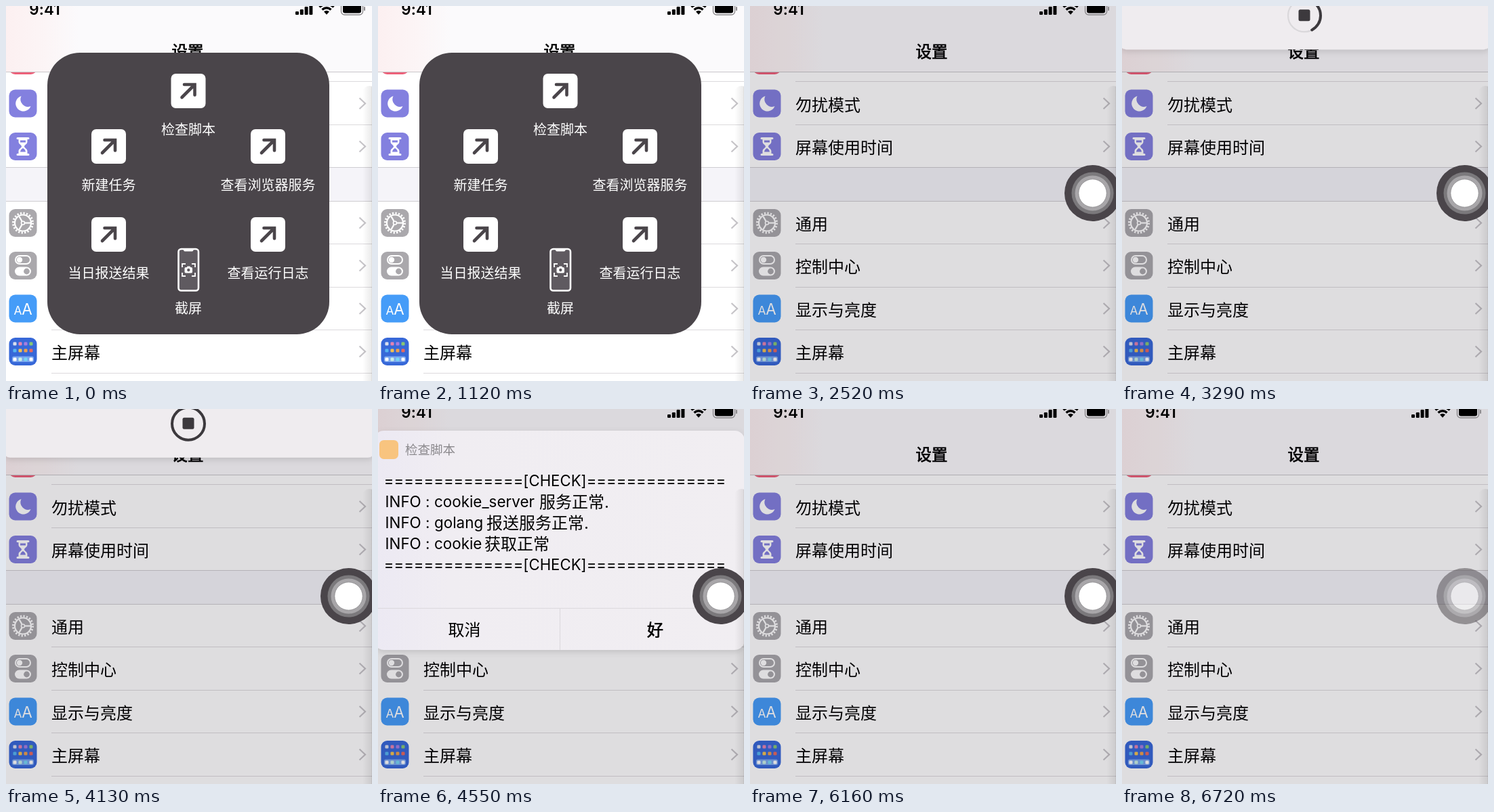
An HTML page for the animation above (6.79 s loop, 540 px wide and 554 px high).

```html
<!DOCTYPE html>
<html lang="zh-CN">
<head>
<meta charset="utf-8">
<style>
html, body { margin: 0; width: 100%; height: 100%; overflow: hidden; background: #fff; }
svg { display: block; width: 540px; height: 554px; }
text { font-family: Inter, "Noto Sans CJK SC", "Noto Sans CJK", sans-serif; white-space: pre; font-feature-settings: "calt" 0; }
</style>
</head>
<body>
<svg id="stage" viewBox="0 0 540 554"></svg>
<script>
const LOOP = 6790, STEP = 70;
const stage = document.getElementById('stage');

// y is the visual middle of the line
const text = (s, x, y, size, o = '') =>
  `<text x="${x}" y="${y + size * .375}" font-size="${size}" ${o}>${s}</text>`;
const rect = (x, y, w, h, r, fill, o = '') =>
  `<rect x="${x}" y="${y}" width="${w}" height="${h}" rx="${r}" fill="${fill}" ${o}/>`;
const circle = (x, y, r, fill, o = '') => `<circle cx="${x}" cy="${y}" r="${r}" fill="${fill}" ${o}/>`;
const path = (d, stroke, w, o = '') => `<path d="${d}" fill="none" stroke="${stroke}" stroke-width="${w}" ${o}/>`;
const group = (id, s) => `<g id="${id}">${s}</g>`;
const at = (x, y, s) => `<g transform="translate(${x} ${y})">${s}</g>`;
const MID = 'text-anchor="middle"';
const SEMIBOLD = 'stroke="#000" stroke-width=".7"';
const DARK = '#4a454a';

// Row icons, drawn around their centre
const moon = '<path d="M-2.5-11A11.5 11.5 0 1 0 11.5 4A11 11 0 0 1-2.5-11Z" fill="#fff"/>';
const hourglass =
  path('M-8-12H8M-8 12H8', '#fff', 3, 'stroke-linecap="round"') +
  '<path d="M-6.5-11H6.5V-7C6.5-3 2-2.5 2 0S6.5 3 6.5 7V11H-6.5V7C-6.5 3-2 2.5-2 0S-6.5-3-6.5-7Z" fill="#fff"/>' +
  '<path d="M-4-9H4V-6H-4ZM-4 8Q-3.5 4 0 2.5Q3.5 4 4 8Z" fill="#8380df"/>';
const gear =
  circle(0, 0, 12, 'none', 'stroke="#fff" stroke-width="2.2"') +
  circle(0, 0, 14.5, 'none', `stroke="#fff" stroke-width="3" stroke-dasharray="${Math.PI * 29 / 40}"`) +
  circle(0, 0, 2.5, 'none', 'stroke="#fff" stroke-width="1.6"') +
  [0, 120, 240].map(a => path('M3 0H11', '#fff', 2.2, `transform="rotate(${a})"`)).join('');
const toggles =
  rect(-11, -14.5, 22, 12, 6, 'none', 'stroke="#fff" stroke-width="2"') + circle(-5, -8.5, 4.2, '#fff') +
  rect(-12, 2, 24, 13, 6.5, '#fff') + circle(5.5, 8.5, 4.4, '#aaa8ac');
const letters = text('A', -7.5, 2.5, 17.5, `${MID} fill="#fff"`) + text('A', 6, 1, 22.5, `${MID} fill="#fff"`);
const dotColors = ['#d9dfee', '#e583b0', '#a77ee0', '#88c774', '#56b5f0', '#f3c24f', '#eda04c', '#e8695f'];
let homeGrid = rect(-16, 7, 32, 8.5, 2.5, '#79a5ee');
for (let i = 0; i < 12; i++) {
  const row = i >> 2;
  homeGrid += rect(-14.5 + (i % 4) * 8, [-14, -4, 9][row], 5, 5, 1.3,
    row < 2 ? dotColors[i] : ['#fff', '#c9f0e4', '#76d5f3', '#fff'][i % 4]);
}

const rows = [
  [144, '#8380df', moon, '勿扰模式'], [207.5, '#8380df', hourglass, '屏幕使用时间'],
  [320.5, '#aaa8ac', gear, '通用'], [383.5, '#aaa8ac', toggles, '控制中心'],
  [447, '#459cf8', letters, '显示与亮度'], [510.5, '#3768d8', homeGrid, '主屏幕']
];

const settings =
  rect(0, 0, 540, 554, 0, '#fff') + rect(0, 238, 540, 51, 0, '#f5f4f9') +
  [111.5, 175.5, 351.5, 415.5, 478.5, 542.5].map(y => path(`M67 ${y}H540`, '#dcdadd', 1)).join('') +
  [238.5, 288.5].map(y => path(`M0 ${y}H540`, '#cfcdd1', 1)).join('') +
  rect(4.5, 60, 41, 41, 9, '#ec6079') +
  rows.map(([y, color, icon, label]) =>
    rect(4.5, y - 20.5, 41, 41, 9, color) + at(25, y, icon) +
    text(label, 67, y + 1.5, 24) +
    path(`M521.5 ${y - 8}L530 ${y}L521.5 ${y + 8}`, '#c6c4c8', 2.2)).join('') +
  rect(0, 0, 540, 97, 0, 'url(#nav)') + path('M0 97.5H540', '#c9c7ca', 1) +
  text('设置', 268, 67, 23.5, `${MID} ${SEMIBOLD}`);

const status =
  text('9:41', 57, 5, 22.5, `${MID} font-weight="600"`) +
  [5, 8, 12, 17].map((h, i) => rect(427 + i * 6.8, 13 - h, 5, h, 1.2, '#000')).join('') +
  path('M462.5 1.5Q473-7.5 483.5 1.5M466.5 5.5Q473 0 479.5 5.5', '#000', 3.4) +
  '<path d="M469 8.3Q473 5.3 477 8.3L473 12.8Z"/>' +
  rect(494.5, -5, 32, 18, 5, 'none', 'stroke="#8b898c" stroke-width="1.4"') +
  rect(497, -3, 27, 13.5, 3, '#000') + rect(528, 1, 2, 6, 1, '#8b898c');

const shortcuts = [
  [269, 125.5, '检查脚本'], [151.5, 207.5, '新建任务'], [386.5, 207.5, '查看浏览器服务'],
  [151.5, 337.5, '当日报送结果'], [386.5, 337.5, '查看运行日志']
];
const label = (s, x, y) => text(s, x, y, 20, `${MID} fill="#fff" font-weight="350"`);
const menuItems =
  shortcuts.map(([x, y, s]) =>
    rect(x - 25.5, y - 25.5, 51, 51, 7, '#fff') +
    at(x, y, path('M-9.5 9.5L9 -9M-6-9.5H9.5V6', DARK, 4.6, 'stroke-linecap="round"')) +
    label(s, x, y + 56.5)).join('') +
  rect(254.5, 359, 29.5, 61.5, 4, '#5f5a60', 'stroke="#fff" stroke-width="2.6"') +
  rect(262, 358, 14.5, 4.5, 2, '#fff') +
  path('M260 386V381H265M274 381H279V386M279 394V399H274M265 399H260V394', '#fff', 1.8) +
  rect(263.5, 386, 11.5, 8.5, 1.8, '#fff') + rect(267, 384.5, 5, 3, 1, '#fff') + circle(269.3, 390, 2.2, '#5f5a60') +
  label('截屏', 269, 446);

const knob =
  circle(505.5, 276.5, 31, '#7b797c') + circle(505.5, 276.5, 26, '#a8a6a9') +
  circle(505.5, 276.5, 20.7, '#fff', 'stroke="#8b898c" stroke-width=".8"');

const RING = 2 * Math.PI * 24;
const banner =
  rect(-4, 35, 548, 100, 10, '#efecef', 'filter="url(#shadow)"') +
  circle(269, 85, 24, 'none', 'stroke="#dad8db" stroke-width="2.2"') +
  circle(269, 85, 24, 'none', `id="arc" stroke="#3c393d" stroke-width="4" stroke-linecap="round" transform="rotate(-90 269 85)"`) +
  rect(260.5, 76, 17, 17, 2.5, '#3c393d');

const RULE = '==============';
const log = [
  ['cookie_server', 238, '服务正常.'], ['golang', 160, '报送服务正常.'], ['cookie', 157, '获取正常']
];
const dialog =
  rect(-6, 35, 547, 324, 15, 'url(#sheet)', 'filter="url(#shadow)"') +
  rect(2, 49, 28, 28, 6.5, '#f8c47f') +
  text('检查脚本', 40, 63.5, 18.5, 'fill="#8b898d"') +
  [109, 233].map(y => text(`${RULE}[CHECK]${RULE}`, 261, y, 22.2, MID)).join('') +
  log.map(([name, x, state], i) => {
    const y = 140 + i * 31;
    return text('INFO :', 10.5, y, 22.4) + text(name, 83, y, 22.4) + text(state, x, y, 24);
  }).join('') +
  path('M0 297.5H540', '#dbd8dc', 1, 'id="rule"') + path('M268.5 298V359', '#dbd8dc', 1) +
  text('取消', 127.5, 329, 24, MID) + text('好', 409, 329, 24, `${MID} ${SEMIBOLD}`);

stage.innerHTML = `<defs>
  <linearGradient id="nav"><stop stop-color="#fcf0f1"/><stop offset=".11" stop-color="#fcf5f6"/><stop offset=".2" stop-color="#fbfafc"/></linearGradient>
  <linearGradient id="edge"><stop stop-color="#000" stop-opacity="0"/><stop offset=".65" stop-color="#000" stop-opacity=".08"/><stop offset=".7" stop-color="#000" stop-opacity=".17"/></linearGradient>
  <linearGradient id="sheet"><stop stop-color="#ece9f3"/><stop offset=".2" stop-color="#f0edf2"/><stop offset="1" stop-color="#f1eef2"/></linearGradient>
  <filter id="shadow" x="-5%" y="-20%" width="110%" height="150%"><feDropShadow dx="0" dy="3" stdDeviation="5" flood-opacity=".13"/></filter>
</defs>` +
  settings + rect(0, 0, 540, 554, 0, '#0a060f', 'id="dim"') + status +
  group('banner', banner) + group('dialog', dialog) +
  rect(526, 118, 20, 450, 10, 'url(#edge)') +
  group('assist', rect(61, 69, 416, 416, 48, DARK, 'id="plate"') + group('items', menuItems) + group('knob', knob));

const el = id => document.getElementById(id);
const set = (id, attrs) => { for (const k in attrs) el(id).setAttribute(k, attrs[k]); };
const ramp = (t, a, b) => Math.min(1, Math.max(0, (t - a) / (b - a)));
const easeOut = k => 1 - (1 - k) ** 3;
const easeIn = k => k ** 3;
const smooth = k => k * k * (3 - 2 * k);
const mix = (a, b, k) => a + (b - a) * k;

function draw(t) {
  set('dim', { opacity: .135 * smooth(ramp(t, 1600, 1980)) });

  // Menu shrinks into the floating button
  const k = smooth(ramp(t, 1450, 1850));
  const size = mix(416, 83, k), x = mix(61, 464, k), y = mix(69, 235, k), s = size / 416;
  set('plate', { x, y, width: size, height: size, rx: mix(48, 41.5, k) });
  set('items', { transform: `translate(${x - 61 * s} ${y - 69 * s}) scale(${s})`, opacity: Math.max(0, 1 - 1.6 * k) });
  set('knob', { opacity: ramp(k, .6, 1) });
  set('assist', { opacity: 1 - ramp(t, 6400, 7040) });

  const down = ramp(t, 3010, 3550), up = ramp(t, 3920, 4200);
  set('banner', {
    transform: `translate(0 ${mix(-150, 0, smooth(down)) - 150 * easeIn(up)})`,
    visibility: down > 0 && up < 1 ? 'visible' : 'hidden'
  });
  const progress = mix(.42, 1, smooth(ramp(t, 3500, 3950)));
  set('arc', { 'stroke-dasharray': `${RING * progress} ${RING}` });

  const shown = ramp(t, 4130, 4656), gone = ramp(t, 5720, 6160);
  set('dialog', {
    transform: `translate(0 ${-380 * (1 - easeOut(shown)) - 380 * easeIn(gone)})`,
    visibility: shown > 0 && gone < 1 ? 'visible' : 'hidden'
  });
  set('rule', { opacity: t < 4970 ? 1 : 0 });
}

function tick() {
  draw(Math.floor(performance.now() % LOOP / STEP) * STEP);
  requestAnimationFrame(tick);
}
tick();
</script>
</body>
</html>
```
